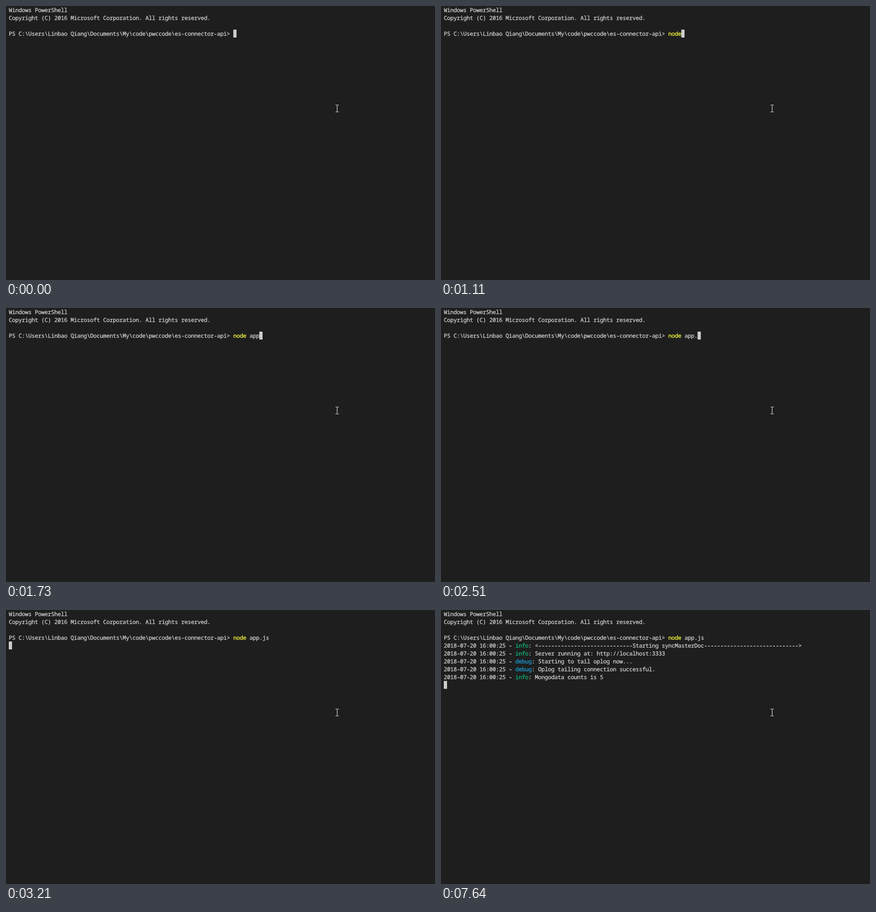
Write an HTML page that moves like this. It is 923 px wide and 591 px high and loops after 8000 ms.

```html
<!DOCTYPE html>
<html lang="en">
<head>
<meta charset="utf-8">
<title>Terminal session</title>
<style>
  html, body { margin: 0; width: 100%; height: 100%; overflow: hidden; background: #1e1e1e; }
  #stage { position: relative; width: 923px; height: 591px; overflow: hidden; }
  /* 7.2px glyph advance, tightened to the 7px terminal cell */
  #screen {
    position: absolute; left: 6px; top: 0; margin: 0;
    font: 12px/17px "Noto Sans Mono", "DejaVu Sans Mono", monospace;
    letter-spacing: -0.2px;
    font-variant-ligatures: none; text-rendering: geometricPrecision;
    -webkit-text-stroke: 0.3px currentColor;
    color: #d2d2d2; white-space: pre;
  }
  #screen div { height: 17px; }
  .command { color: #ffff40; }
  .info { color: #0dbc79; }
  .debug { color: #1b9fd6; }
  #caret { position: absolute; width: 7px; height: 17px; background: #cccccc; }
  #pointer { position: absolute; left: 708px; top: 212px; }
</style>
</head>
<body>
<div id="stage">
  <div id="caret"></div>
  <div id="screen"></div>
  <svg id="pointer" width="10" height="18" shape-rendering="crispEdges">
    <path fill="#fff" d="M1 1h3v1h-3zM5 1h3v1h-3zM4 2h1v14h-1zM1 16h3v1h-3zM5 16h3v1h-3z"/>
  </svg>
</div>
<script>
const LOOP = 8000, CELL = 7, ROW = 17, LEFT = 6;
const prompt = "PS C:\\Users\\Linbao Qiang\\Documents\\My\\code\\pwccode\\es-connector-api> ";
const typed = "node app.js";
const keyTimes = [650, 880, 960, 1110, 1260, 1490, 1660, 1730, 2510, 2980, 3150];
const enterTime = 3210;
const dashes = "-".repeat(29);
const log = [
  [7570, "info", `<${dashes}Starting syncMasterDoc${dashes}>`],
  [7570, "info", "Server running at: http://localhost:3333"],
  [7640, "debug", "Starting to tail oplog now..."],
  [7640, "debug", "Oplog tailing connection successful."],
  [7640, "info", "Mongodata counts is 5"]
];

const screen = document.getElementById("screen");
const caret = document.getElementById("caret");

function addLine(...parts) {
  const line = document.createElement("div");
  line.append(...parts);
  screen.append(line);
  return line;
}

function span(text, cls) {
  const el = document.createElement("span");
  el.className = cls;
  el.textContent = text;
  return el;
}

addLine("Windows PowerShell");
addLine("Copyright (C) 2016 Microsoft Corporation. All rights reserved.");
addLine("");
const command = span("", "command");
const args = span("", "args");
addLine(prompt, command, args);
const logLines = log.map(([, level, text]) =>
  addLine("2018-07-20 16:00:25 - ", span(level, level), ": " + text));

let last = "";

function draw(t) {
  const keys = keyTimes.filter(k => k <= t).length;
  const shown = log.filter(([at]) => at <= t).length;
  const entered = t >= enterTime;
  const state = [keys, shown, entered].join();
  if (state === last) return;
  last = state;

  const text = typed.slice(0, keys);
  command.textContent = text.slice(0, 4);
  args.textContent = text.slice(4);
  logLines.forEach((line, i) => line.style.visibility = i < shown ? "visible" : "hidden");

  const col = entered ? 0 : prompt.length + keys;
  const row = entered ? 4 + shown : 3;
  caret.style.left = LEFT + col * CELL + "px";
  caret.style.top = row * ROW + "px";
}

const start = performance.now();
function tick() {
  draw((performance.now() - start) % LOOP);
  requestAnimationFrame(tick);
}
tick();
</script>
</body>
</html>
```
